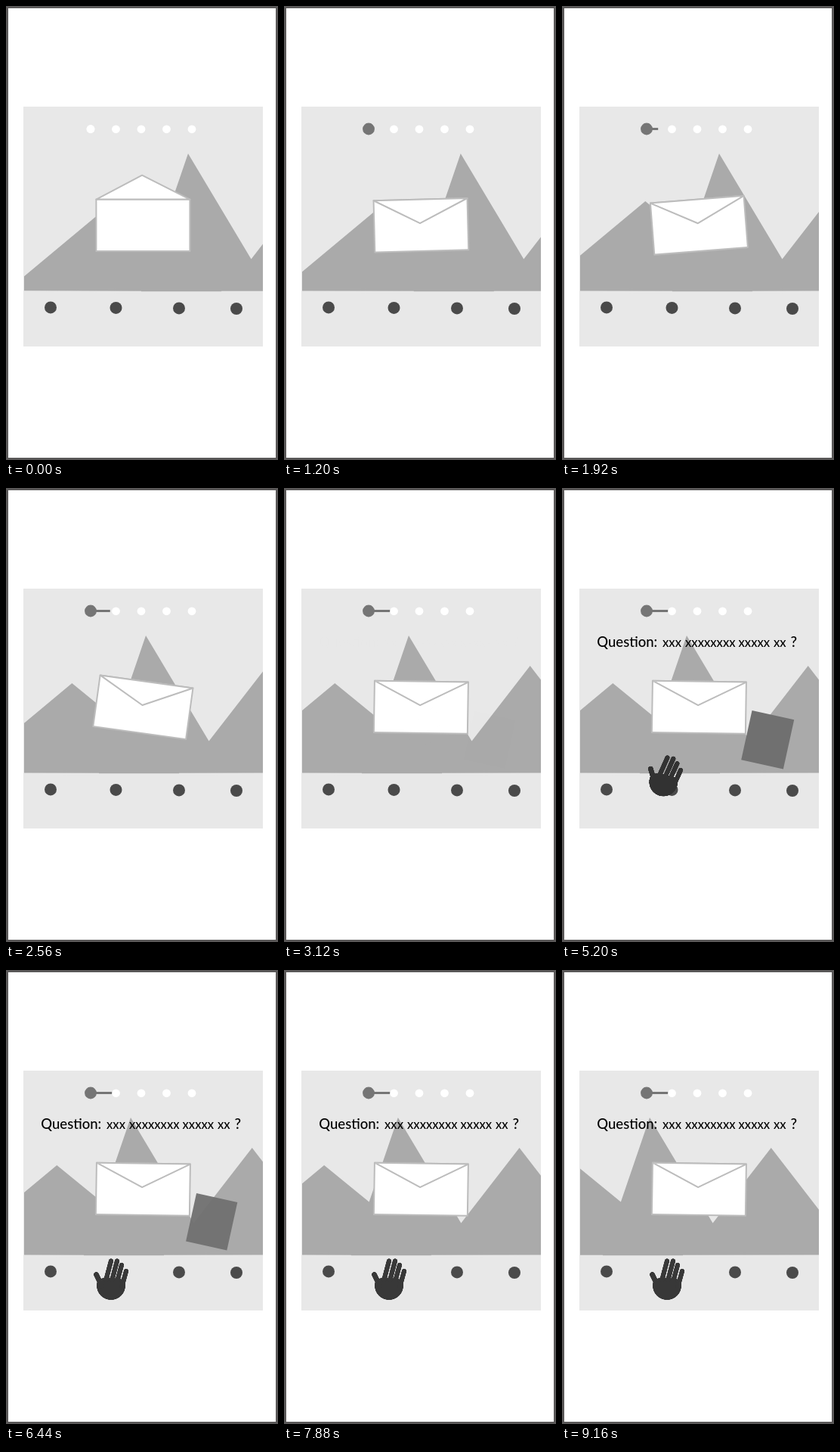
An HTML page with a canvas for the animation above (9200 ms loop, 360 px wide and 600 px high).

```html
<!DOCTYPE html>
<html lang="en">
<head>
<meta charset="utf-8">
<title>Envelope quiz</title>
<style>
html, body { margin: 0; width: 100%; height: 100%; overflow: hidden; background: #fff; }
canvas { display: block; width: 360px; height: 600px; }
</style>
</head>
<body>
<canvas id="stage"></canvas>
<script>
const LOOP = 9200;
const TAU = Math.PI * 2;
const RAD = Math.PI / 180;
const canvas = document.getElementById('stage');
const ctx = canvas.getContext('2d');
const dpr = window.devicePixelRatio || 1;
canvas.width = 360 * dpr;
canvas.height = 600 * dpr;

const progress = (t, from, to) => Math.min(1, Math.max(0, (t - from) / (to - from)));
const mix = (a, b, p) => a + (b - a) * p;
const smooth = p => (1 - Math.cos(Math.PI * p)) / 2;

function tracePath(points) {
  ctx.beginPath();
  points.forEach(([x, y], i) => i ? ctx.lineTo(x, y) : ctx.moveTo(x, y));
}

function dot(x, y, r, color) {
  ctx.fillStyle = color;
  ctx.beginPath();
  ctx.arc(x, y, r, 0, TAU);
  ctx.fill();
}

// The hand is rendered once so that it fades as a single shape.
const HAND_SCALE = 4;
const HAND_HALF = 45;
const hand = document.createElement('canvas');
hand.width = hand.height = HAND_HALF * 2 * HAND_SCALE;
(function renderHand() {
  const g = hand.getContext('2d');
  g.scale(HAND_SCALE, HAND_SCALE);
  g.translate(HAND_HALF, HAND_HALF);
  g.fillStyle = g.strokeStyle = '#323232';
  g.lineCap = 'round';
  g.beginPath();
  g.arc(0, 0, 19, -0.2, Math.PI + 0.4);
  g.lineTo(-8, -11);
  g.lineTo(13, -9);
  g.fill();
  const fingers = [
    [-19.5, -14.5, -12.5, 0, 7],
    [0, -32.5, -6.5, -8, 6.4],
    [8, -32.5, 1.5, -8, 6.4],
    [14, -27, 8, -5, 6.4],
    [20, -19, 14.5, 1, 6.4]
  ];
  for (const [x1, y1, x2, y2, width] of fingers) {
    g.lineWidth = width;
    g.beginPath();
    g.moveTo(x1, y1);
    g.lineTo(x2, y2);
    g.stroke();
  }
})();

const RIDGE = [
  [1, 376.3], [143.3, 258], [202.8, 306.5], [241, 195],
  [324.5, 334.5], [401.7, 235], [511, 376.3],
  [285, 376.8], [285, 377.3], [179, 377.3], [179, 376.8]
];

function drawMountains(t) {
  const shift = 76 * progress(t, 1000, 3120) + 50 * progress(t, 7360, 9200);
  ctx.save();
  ctx.beginPath();
  ctx.rect(24, 133, 316, 317);
  ctx.clip();
  ctx.fillStyle = '#aaaaaa';
  tracePath(RIDGE.map(([x, y]) => [x - shift, y]));
  ctx.fill();
  ctx.restore();
}

function drawSteps(t) {
  if (t > 1000) {
    ctx.strokeStyle = '#757575';
    ctx.lineWidth = 3;
    tracePath([[112, 162.5], [mix(112, 147, progress(t, 1000, 3120)), 162.5]]);
    ctx.stroke();
  }
  for (let i = 0; i < 5; i++) dot(112 + i * 33.5, 162.8, 5.4, '#fff');
  const p = progress(t, 0, 1040);
  const shade = Math.round(mix(255, 117, p));
  dot(112, 162.5, mix(5.4, 7.9, p), `rgb(${shade},${shade},${shade})`);
}

function envelopeAngle(t) {
  const keys = [[1000, 0], [1707, -8], [2413, 8.7], [3120, 0.9]];
  let angle = 0;
  for (let i = 1; i < keys.length; i++) {
    const [t0, a0] = keys[i - 1];
    const [t1, a1] = keys[i];
    if (t >= t0) angle = mix(a0, a1, smooth(progress(t, t0, t1)));
  }
  return angle;
}

function drawEnvelope(t) {
  const apex = mix(-66, -2.5, progress(t, 0, 1000));
  ctx.save();
  ctx.translate(181.4, 289.6);
  ctx.rotate(envelopeAngle(t) * RAD);
  ctx.fillStyle = '#fff';
  ctx.strokeStyle = '#bcbcbc';
  ctx.lineWidth = 2;
  ctx.lineJoin = 'round';
  tracePath([[-62, -34], [62, -34], [62, 34.3], [-62, 34.3]]);
  ctx.closePath();
  ctx.fill();
  ctx.stroke();
  tracePath([[-62, -34], [-1.3, apex], [62, -34]]);
  ctx.closePath();
  ctx.fill();
  ctx.stroke();
  ctx.restore();
}

function drawQuestion(alpha) {
  ctx.globalAlpha = alpha;
  ctx.fillStyle = '#000';
  ctx.font = '500 18.5px Lato, sans-serif';
  ctx.fillText('Question:', 46.3, 210);
  ctx.font = '500 16.5px Lato, sans-serif';
  const words = [['xxx', 133], ['xxxxxxxx', 163], ['xxxxx', 233.5], ['xx', 280]];
  for (const [word, x] of words) ctx.fillText(word, x, 210);
  ctx.font = '500 19px Lato, sans-serif';
  ctx.fillText('?', 302.5, 210);
  ctx.globalAlpha = 1;
}

function drawCard(t, alpha) {
  const leave = progress(t, 6400, 7200);
  if (leave === 1) return;
  const scale = 1 - leave / 2;
  ctx.save();
  ctx.globalAlpha = alpha * (1 - leave);
  ctx.translate(272.2, 332.8);
  ctx.rotate(12.4 * RAD);
  ctx.scale(scale, scale);
  ctx.fillStyle = '#707070';
  ctx.fillRect(-28.5, -33.4, 57, 66.8);
  ctx.restore();
}

function drawHand(t, alpha) {
  const p = progress(t, 4160, 5640);
  const q = 1 - p;
  ctx.save();
  ctx.globalAlpha = alpha * mix(1, 0.967, progress(t, 5760, 6080));
  ctx.translate(q * q * 182 + 2 * p * q * 118.6 + p * p * 139, mix(321, 417, p));
  ctx.rotate(31 * q * RAD);
  ctx.drawImage(hand, -HAND_HALF, -HAND_HALF, HAND_HALF * 2, HAND_HALF * 2);
  ctx.restore();
}

function draw(t) {
  const appear = progress(t, 3120, 3400);
  ctx.setTransform(dpr, 0, 0, dpr, 0, 0);
  ctx.fillStyle = '#5a5858';
  ctx.fillRect(0, 0, 360, 600);
  ctx.fillStyle = '#fff';
  ctx.fillRect(3, 3, 354, 594);
  ctx.fillStyle = '#e8e8e8';
  ctx.fillRect(23, 133, 317, 317);

  drawMountains(t);
  drawSteps(t);
  dot(59, 398.4, 8, '#4a4a4a');
  if (t < 5440) dot(145.5, 398.9, 8, '#4a4a4a');
  dot(229, 399.4, 8, '#4a4a4a');
  dot(305, 400, 8, '#4a4a4a');
  drawEnvelope(t);
  if (appear > 0) {
    drawQuestion(appear);
    drawCard(t, appear);
    drawHand(t, appear);
  }
}

const start = performance.now();
function tick() {
  draw((performance.now() - start) % LOOP);
  requestAnimationFrame(tick);
}
tick();
</script>
</body>
</html>
```
